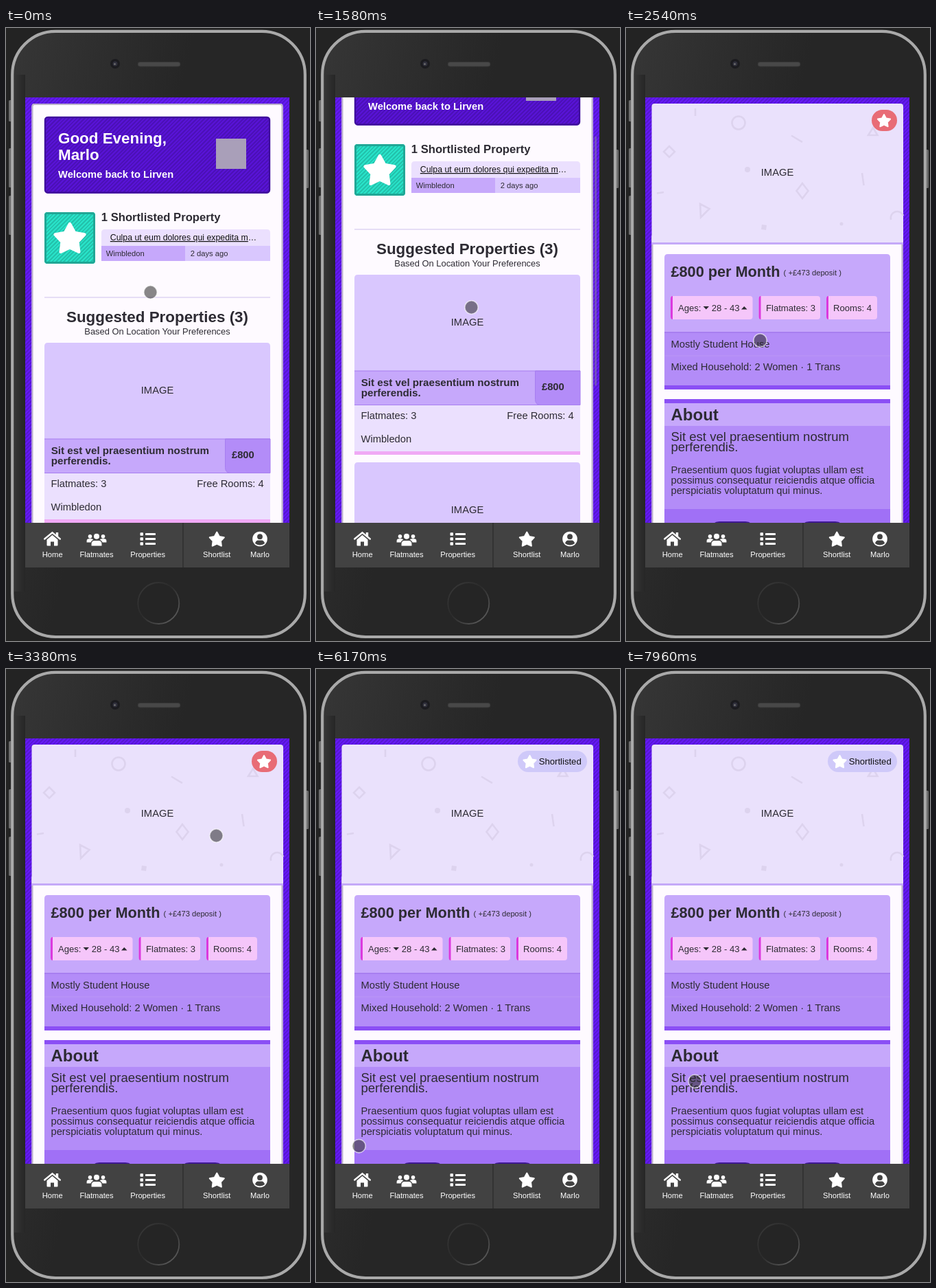
These frames come from a looping animation (443x892 px, 8000 ms). An HTML page:

```html
<!DOCTYPE html>
<html lang="en">
<head>
<meta charset="utf-8">
<title>Flat finder on a phone</title>
<style>
html, body { margin: 0; width: 100%; height: 100%; overflow: hidden; background: #232323; }
svg { display: block; width: 100%; height: 100%; }
text { font-family: "Liberation Sans", Arial, sans-serif; white-space: pre; }
</style>
</head>
<body>
<svg id="stage" viewBox="0 0 443 892" xmlns="http://www.w3.org/2000/svg"></svg>
<script>
const LOOP = 8000;
const INK = '#2d2b33', VIOLET = '#6419f5', LOGO = '#a99fb9';
const PALE = '#ebe0fe', LILAC = '#d9c7fe', MAUVE = '#c6a8fb', PURPLE = '#b38cf8', EDGE = '#a77ef0', DEEP = '#8b4ff5';

const rect = (x, y, x2, y2, fill, more = '') =>
  `<rect x="${x}" y="${y}" width="${x2 - x}" height="${y2 - y}" fill="${fill}" ${more}/>`;
const circle = (x, y, r, more = '') => `<circle cx="${x}" cy="${y}" r="${r}" ${more}/>`;
const path = (d, more = '') => `<path d="${d}" ${more}/>`;
const line = (d, color, width, more = '') => path(d, `fill="none" stroke="${color}" stroke-width="${width}" ${more}`);
const text = (x, y, size, str, more = '') =>
  `<text x="${x}" y="${y}" font-size="${size}" fill="${INK}" ${more}>${str}</text>`;
const bold = 'font-weight="700"';
const mid = 'text-anchor="middle"';
const white = 'style="fill:#fff"';

// rectangle with only its top corners rounded
const tab = (x, y, x2, y2, r, fill) =>
  path(`M${x} ${y2}V${y + r}q0 ${-r} ${r} ${-r}H${x2 - r}q${r} 0 ${r} ${r}V${y2}z`, `fill="${fill}"`);

// diagonal stripes start at the top left corner of the box
const striped = (x, y, x2, y2, fill, r = 0) =>
  rect(x, y, x2, y2, fill, `rx="${r}"`) +
  `<g transform="translate(${x} ${y})">${rect(0, 0, x2 - x, y2 - y, 'url(#stripes)', `rx="${r}"`)}</g>`;

function star(cx, cy, r) {
  const pts = [];
  for (let i = 0; i < 10; i++) {
    const a = i * Math.PI / 5, d = i % 2 ? r * 0.53 : r;
    pts.push((cx + d * Math.sin(a)).toFixed(2) + ',' + (cy - d * Math.cos(a)).toFixed(2));
  }
  return `<polygon points="${pts.join(' ')}" fill="#fff" stroke="#fff" stroke-width="${r * 0.2}" stroke-linejoin="round"/>`;
}

// stripes 4px apart, measured across the diagonal
const step = 4 * Math.SQRT1_2;
const defs = `<defs>
  <linearGradient id="stripes" gradientUnits="userSpaceOnUse" x1="0" y1="0" x2="${step}" y2="${step}" spreadMethod="repeat">
    <stop offset=".5" stop-opacity="0"/><stop offset=".5" stop-opacity=".14"/></linearGradient>
  <linearGradient id="body" x1="0" y1="0" x2=".5" y2=".25"><stop offset="0" stop-color="#363636"/>
    <stop offset="1" stop-color="#262626"/></linearGradient>
  <linearGradient id="side"><stop offset="0" stop-color="#363636"/><stop offset="1" stop-color="#262626"/></linearGradient>
  <linearGradient id="ring" x1="0" y1="0" x2="1" y2="1"><stop offset="0" stop-color="#3a3a3a"/>
    <stop offset=".45" stop-color="#2b2b2b"/><stop offset="1" stop-color="#666"/></linearGradient>
  <clipPath id="view"><rect x="28" y="101" width="385" height="619.5"/></clipPath>
</defs>`;

function phone() {
  const keys = [[4, 105, 136], [4, 175, 232], [4, 244, 301], [436, 177, 233]]
    .map(([x, a, b]) => rect(x, a, x + 5, b, '#6c6c6c', 'rx="1.5"')).join('');
  return rect(0, 0, 443, 892, '#232323') + keys +
    rect(9.2, 4.8, 435.8, 886, 'url(#body)', 'rx="63" stroke="#a9a9a9" stroke-width="4.2"') +
    rect(12, 68, 28, 820, 'url(#side)') +
    circle(159, 52, 7, 'fill="#1b1b1f"') + circle(159, 52, 3.5, 'fill="#30303c"') +
    circle(158.5, 52.5, 1.3, 'fill="#777"') +
    rect(192, 49.5, 254, 56, '#484848', 'rx="3.2" stroke="#363636"') +
    circle(222.3, 837, 30, 'fill="#252525" stroke="url(#ring)" stroke-width="1.8"');
}

function navIcons() {
  const person = (x, y, k) => circle(x, y - 4.5 * k, 4 * k) +
    path(`M${x - 7 * k} ${y + 8 * k}v${-3 * k}q0 ${-4.5 * k} ${4.5 * k} ${-4.5 * k}h${5 * k}q${4.5 * k} 0 ${4.5 * k} ${4.5 * k}v${3 * k}z`);
  const home = line('M56.2 743.5L67.5 734.2L78.8 743.5', '#fff', 2.4, 'stroke-linecap="round"') +
    path('M72.8 734h3.4v7l-3.4-2.8zM59.5 744.4L67.5 737.8L75.5 744.4V752.5q0 1-1 1H70V747.5H65V753.5H60.5q-1 0-1-1z');
  const group = person(122.5, 743, .7) + person(141.5, 743, .7) +
    `<g stroke="#424242" stroke-width="1.2">${person(132, 744.8, 1.15)}</g>`;
  const list = [736.5, 743.5, 750.5].map(y =>
    rect(195.5, y - 2.2, 200, y + 2.2, '#fff', 'rx=".8"') + rect(203, y - 1.5, 218, y + 1.5, '#fff', 'rx=".8"')).join('');
  const user = circle(370, 743.5, 10.8) +
    `<g fill="#424242">${circle(370, 740.2, 3.9)}${path('M363 750q1-4.5 4.5-4.5h5q3.5 0 4.5 4.5q-2.5 2.4-7 2.4t-7-2.4z')}</g>`;
  return `<g fill="#fff">${home}${group}${list}${user}</g>` + star(307.3, 744.7, 11);
}

function nav() {
  const labels = [[67.7, 'Home'], [132, 'Flatmates'], [206.7, 'Properties'], [307.2, 'Shortlist'], [370, 'Marlo']];
  return rect(28, 720, 413, 785, '#424242') + rect(257, 720, 259, 785, '#333') + navIcons() +
    labels.map(([x, s]) => text(x, 770, 11.2, s, mid + white)).join('');
}

const sheet = (y, y2) => rect(37.5, y, 403.5, y2, '#fefaff', 'rx="4"') +
  rect(38.5, y + 1, 402.5, y2 - 1, 'none', 'rx="3" stroke="#b9adca" stroke-width="2"');

function card(y) {
  return `<g transform="translate(0 ${y})">` +
    tab(56, 0, 385, 140, 5, LILAC) + text(220.5, 74, 14.72, 'IMAGE', mid) +
    rect(56, 140, 385, 190, MAUVE) +
    path('M319.5 140H385V189.5H327.5q-8 0-8-8z', `fill="${PURPLE}" stroke="${EDGE}"`) +
    rect(56, 139.5, 385, 140.5, EDGE) + rect(56, 189, 385, 190, EDGE) +
    text(65.7, 162, 15.2, 'Sit est vel praesentium nostrum', bold) +
    text(65.7, 177, 15.2, 'perferendis.', bold) + text(329, 168, 14.72, '£800', bold) +
    rect(56, 190, 385, 257, PALE) + text(65.5, 210, 14.72, 'Flatmates: 3') +
    text(375.7, 210, 14.72, 'Free Rooms: 4', 'text-anchor="end"') + text(65.5, 244, 14.72, 'Wimbledon') +
    rect(56, 257, 385, 262, '#f0a9f5') + '</g>';
}

function homePage() {
  return sheet(110, 1300) +
    striped(56, 129, 385, 240.5, '#5813d6', 5) +
    rect(57, 130, 384, 239.5, 'none', 'rx="4" stroke="#3f0f9c" stroke-width="2.4"') +
    text(76, 168, 22.4, 'Good Evening,', bold + white) + text(76, 192, 22.4, 'Marlo', bold + white) +
    text(76, 218, 14.72, 'Welcome back to Lirven', bold + white) +
    rect(306, 161, 350, 205, LOGO) +
    striped(56, 268, 130, 343, '#28e2c8', 4) +
    rect(57.5, 269.5, 128.5, 341.5, 'none', 'rx="3" stroke="#20a796" stroke-width="3"') +
    star(93, 307.5, 22.5) +
    text(138.8, 281, 16.64, '1 Shortlisted Property', bold) +
    tab(139, 293, 385, 317, 5, PALE) +
    text(151.8, 309, 12.35, '<tspan text-decoration="underline">Culpa ut eum dolores qui expedita m</tspan>…', 'style="fill:#111"') +
    rect(139, 317, 261, 339, MAUVE) + rect(261, 317, 385, 339, LILAC) +
    text(145.7, 332, 11.2, 'Wimbledon') + text(268.7, 332, 11.2, '2 days ago') +
    rect(56, 391, 385, 393, '#e6ddf6') +
    text(220.5, 428, 22.4, 'Suggested Properties (3)', bold + ' ' + mid) +
    text(220.5, 446, 12.92, 'Based On Location Your Preferences', mid) +
    [0, 1, 2].map(i => card(458 + i * 273)).join('');
}

function confetti() {
  const marks = 'M63 172l8 8-8 8-8-8zM257 226l8.5 11-8.5 11-8.5-11zM108 256l13.5 7-12.5 12.5z' +
    'M353 156l7-11 6.5 11zM241 156.5l16 9.5M344 211l2.5 18M101 117v11M45 240.5l10-1.5';
  return `<g fill="none" stroke="#ddd3ee" stroke-width="2.6">${path(marks)}${circle(164, 138, 9.5)}` +
    path('M386 279a9.5 9.5 0 0 1 18-6') + '</g>' +
    `<g fill="#ddd3ee">${circle(177, 206, 4)}${circle(314, 285, 2.5)}<path d="M198 286l7 1-1 7-7-1z"/></g>`;
}

function chip(x, x2) {
  return rect(x, 390, x2, 424, '#f5c6fa', 'rx="4"') +
    path(`M${x + 3} 390v34q-3 0-3-4v-26q0-4 3-4z`, 'fill="#dc39de"');
}

function detailPage() {
  return sheet(300, 760) + tab(37.5, 110, 404, 312, 4, '#eae1fc') + confetti() +
    rect(37.5, 312, 404, 315, '#c4a9f8') + text(220.5, 215, 14.72, 'IMAGE', mid) +
    tab(56, 329, 385, 442, 5, MAUVE) + text(65.5, 362, 21.7, '£800 per Month', bold) +
    text(229.6, 360, 11.2, '( +£473 deposit )') +
    chip(65, 184.5) + chip(193.5, 283) + chip(292, 366) +
    text(76, 412, 13.1, 'Ages:') + text(124.7, 412, 13.1, '28 - 43') +
    path('M112.5 405h8.5l-4.25 4.5zM168 409.5h8.5l-4.25-4.5z', `fill="${INK}"`) +
    text(204, 412, 13.1, 'Flatmates: 3') + text(302, 412, 13.1, 'Rooms: 4') +
    rect(56, 442, 385, 520, PURPLE) + rect(56, 442, 385, 444, EDGE) +
    rect(56, 476.5, 385, 477.5, '#bb98f8') +
    text(65.5, 465, 14.72, 'Mostly Student House') +
    text(65.5, 498, 14.72, 'Mixed Household: 2 Women · 1 Trans') +
    rect(56, 520, 385, 526, DEEP) + rect(56, 540, 385, 546, DEEP) +
    rect(56, 546, 385, 579, MAUVE) + text(65.5, 571, 24, 'About', bold) +
    rect(56, 579, 385, 700, PURPLE) +
    text(65.5, 601, 18.55, 'Sit est vel praesentium nostrum') + text(65.5, 616, 18.55, 'perferendis.') +
    text(65.5, 648, 14.72, 'Praesentium quos fugiat voluptas ullam est') +
    text(65.5, 663, 14.72, 'possimus consequatur reiciendis atque officia') +
    text(65.5, 678, 14.72, 'perspiciatis voluptatum qui minus.') +
    rect(56, 700, 385, 730, '#a070f6') +
    rect(122, 718, 188, 750, '#3d1791', 'rx="14"') + rect(253, 718, 319, 750, '#3d1791', 'rx="14"') +
    `<g id="add">${rect(358, 119, 395, 150, '#e86c76', 'rx="15.5"')}${star(376, 135.5, 9.6)}</g>` +
    `<g id="added">${rect(294, 119, 395, 150, '#cfc9f9', 'rx="15.5"')}${star(311.5, 135.5, 9.6)}` +
    text(324.8, 139, 13.1, 'Shortlisted', 'style="fill:#111"') + '</g>';
}

const splashPage = () => rect(175, 330, 265, 420, LOGO) +
  [193, 220.6, 248.2].map(x => circle(x, 441, 9, 'class="dot" fill="#fff"')).join('');

const stage = document.getElementById('stage');
stage.innerHTML = defs + phone() +
  `<g clip-path="url(#view)">${striped(28, 101, 413, 721, VIOLET)}` +
  `<g id="home">${homePage()}</g>` +
  rect(406, 0, 409, 363, '#8277a6', 'id="thumb" rx="1.5" fill-opacity=".55"') +
  `<g id="splash">${splashPage()}</g><g id="detail">${detailPage()}</g></g>` + nav() +
  circle(0, 0, 9.7, 'id="touch" fill="#2a2a2a" fill-opacity=".56" stroke="#fff" stroke-opacity=".62" stroke-width="1.6"');

const el = id => document.getElementById(id);
const parts = Object.fromEntries(['home', 'thumb', 'splash', 'detail', 'add', 'added', 'touch'].map(id => [id, el(id)]));
const dots = [...document.querySelectorAll('.dot')];

// touch point: start, end, x, y of each move; it rests in between
const moves = [
  [0, 0, 210.5, 384.5], [920, 1000, 222.5, 398.5], [1580, 1580, 226.5, 406.5], [1590, 1960, 198, 447],
  [2170, 2540, 195.5, 454.5], [2880, 3000, 330, 400], [3000, 3070, 374, 335], [3070, 3170, 285.5, 262.5],
  [3380, 3380, 306.5, 242.5], [3540, 3830, 384.5, 145.5], [3960, 4130, 371.5, 133.5],
  [4340, 4630, 383.5, 178.5], [4630, 4960, 372.5, 290], [5710, 6170, 62.5, 694], [6170, 6540, 70.5, 742.5],
  [6550, 6630, 72.5, 748.5], [6790, 7130, 155.5, 544.5], [7540, 7710, 97.5, 592], [7710, 7790, 110.5, 605.5],
  [7960, 7960, 100.5, 600]
];

function touchAt(t) {
  let x = 0, y = 0;
  for (const [a, b, nx, ny] of moves) {
    if (t < a) break;
    const p = t >= b ? 1 : (t - a) / (b - a);
    x += (nx - x) * p;
    y += (ny - y) * p;
  }
  return [x, y];
}

const show = (node, on) => node.setAttribute('display', on ? 'inline' : 'none');

function draw(t) {
  const page = t < 2170 ? 'home' : t < 2540 ? 'splash' : 'detail';
  for (const id of ['home', 'splash', 'detail']) show(parts[id], page === id);

  const scroll = t < 1580 ? 0 : 99;
  parts.home.setAttribute('transform', `translate(0 ${-scroll})`);
  show(parts.thumb, page === 'home' && scroll > 0);
  parts.thumb.setAttribute('y', 101 + scroll * 0.57);
  parts.thumb.setAttribute('opacity', Math.max(0, Math.min(1, (1960 - t) / 200)));

  const swing = 1 - Math.abs(1 - (Math.max(0, t - 2170) % 800) / 400);
  dots.forEach((d, i) => d.setAttribute('r', i === 1 ? 5.6 + 3.6 * swing : 9.2 - 3.6 * swing));

  show(parts.add, t < 4400);
  show(parts.added, t >= 4400);

  const [x, y] = touchAt(t);
  parts.touch.setAttribute('cx', x);
  parts.touch.setAttribute('cy', y);
}

const start = performance.now();
function tick() {
  draw((performance.now() - start) % LOOP);
  requestAnimationFrame(tick);
}
tick();
</script>
</body>
</html>
```
